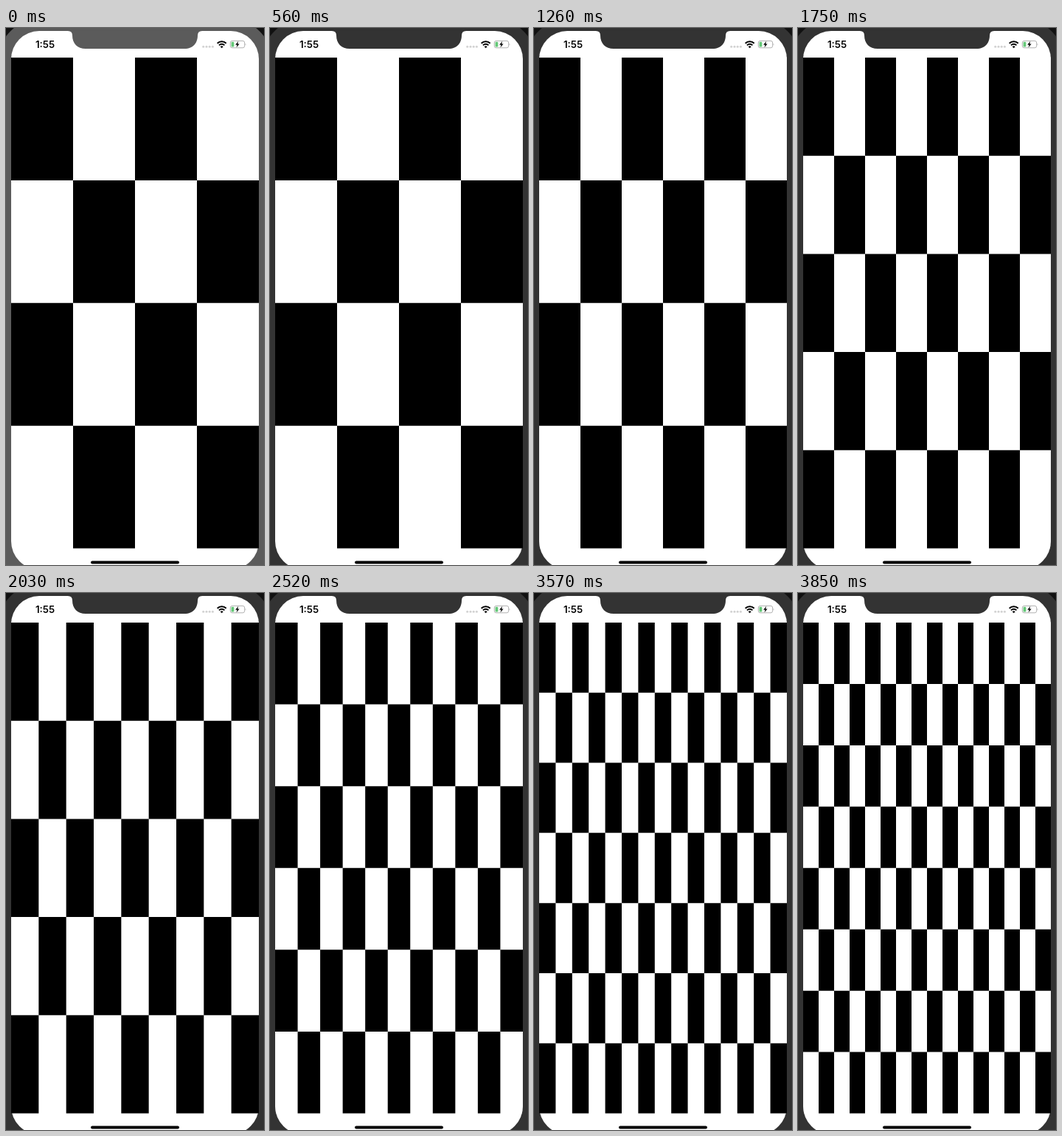
Animation, 350 px wide and 726 px high, one loop 4.55 s. Source, as an HTML page:

```html
<!DOCTYPE html>
<html lang="en">
<head>
<meta charset="utf-8">
<title>Growing checkerboard</title>
<style>
  html, body { margin: 0; width: 100%; height: 100%; overflow: hidden; background: #111; }
  svg { display: block; width: 350px; height: 726px; color: #5b5b5b; }
  text { font: 600 13.3px Inter, "Liberation Sans", sans-serif; }
</style>
</head>
<body>
<svg id="stage" viewBox="0 0 350 726">
  <!-- phone body and screen -->
  <rect x="-9" y="-10" width="368" height="760" rx="50" fill="currentColor"/>
  <rect x="7" y="4" width="336" height="728" rx="38" fill="#fff"/>
  <path id="board"/>
  <path d="M84 3.5V4Q90 4 90 10C90 21 97 28 108 28H242C253 28 260 21 260 10Q260 4 266 4V3.5Z" fill="currentColor"/>

  <!-- status bar -->
  <text x="40" y="27.2">1:55</text>
  <g fill="#d2d2d2">
    <circle cx="267.7" cy="25.3" r="1.5"/>
    <circle cx="272" cy="25.3" r="1.5"/>
    <circle cx="276.2" cy="25.3" r="1.5"/>
    <circle cx="280.4" cy="25.3" r="1.5"/>
  </g>
  <g fill="none" stroke="#000" stroke-width="2">
    <path d="M286.7 20.8A8.4 8.4 0 0 1 298.7 20.8"/>
    <path d="M289 23.4A5.2 5.2 0 0 1 296.4 23.4"/>
  </g>
  <path d="M290.7 25.2A2.9 2.9 0 0 1 294.7 25.2L292.7 27.3Z"/>
  <rect x="304.3" y="17.4" width="19.4" height="9.4" rx="2.6" fill="#fff" stroke="#aaa" stroke-width=".9"/>
  <rect x="305.6" y="18.7" width="3.8" height="6.8" rx="1.2" fill="#65c878"/>
  <path d="M324.7 20.4Q326.2 22.1 324.7 23.8Z" fill="#999"/>
  <path d="M315.2 17.8L311.2 22.7H313.6L312.5 26.5L316.6 21.4H314.2Z"/>

  <!-- home bar -->
  <rect x="115" y="720.5" width="120" height="4" rx="2"/>
</svg>
<script>
  const LOOP = 4550;
  const stage = document.getElementById('stage');
  const board = document.getElementById('board');
  const area = { x: 7, y: 40, w: 336, h: 663.5 };

  // each moment adds one column
  const growTimes = [980, 1260, 1540, 1750, 2030, 2310, 2520, 2800, 3080, 3360, 3570, 3850];
  const bodyTones = [[0, '#5b5b5b'], [70, '#444'], [140, '#363636'], [560, '#333']];

  function checker(cols) {
    const rows = Math.floor((cols + 8) / 3);
    const w = area.w / cols, h = area.h / rows;
    let d = '';
    for (let r = 0; r < rows; r++) {
      for (let c = r % 2; c < cols; c += 2) {
        d += `M${area.x + c * w} ${area.y + r * h}h${w}v${h}h${-w}z`;
      }
    }
    return d;
  }

  let shown = 0;
  function draw(t) {
    const cols = 4 + growTimes.filter(at => at <= t).length;
    if (cols !== shown) {
      board.setAttribute('d', checker(cols));
      shown = cols;
    }
    stage.style.color = bodyTones.filter(([at]) => at <= t).pop()[1];
  }

  let start = null;
  function tick() {
    const now = performance.now();
    if (start === null) start = now;
    draw((now - start) % LOOP);
    requestAnimationFrame(tick);
  }
  draw(0);
  requestAnimationFrame(tick);
</script>
</body>
</html>
```
